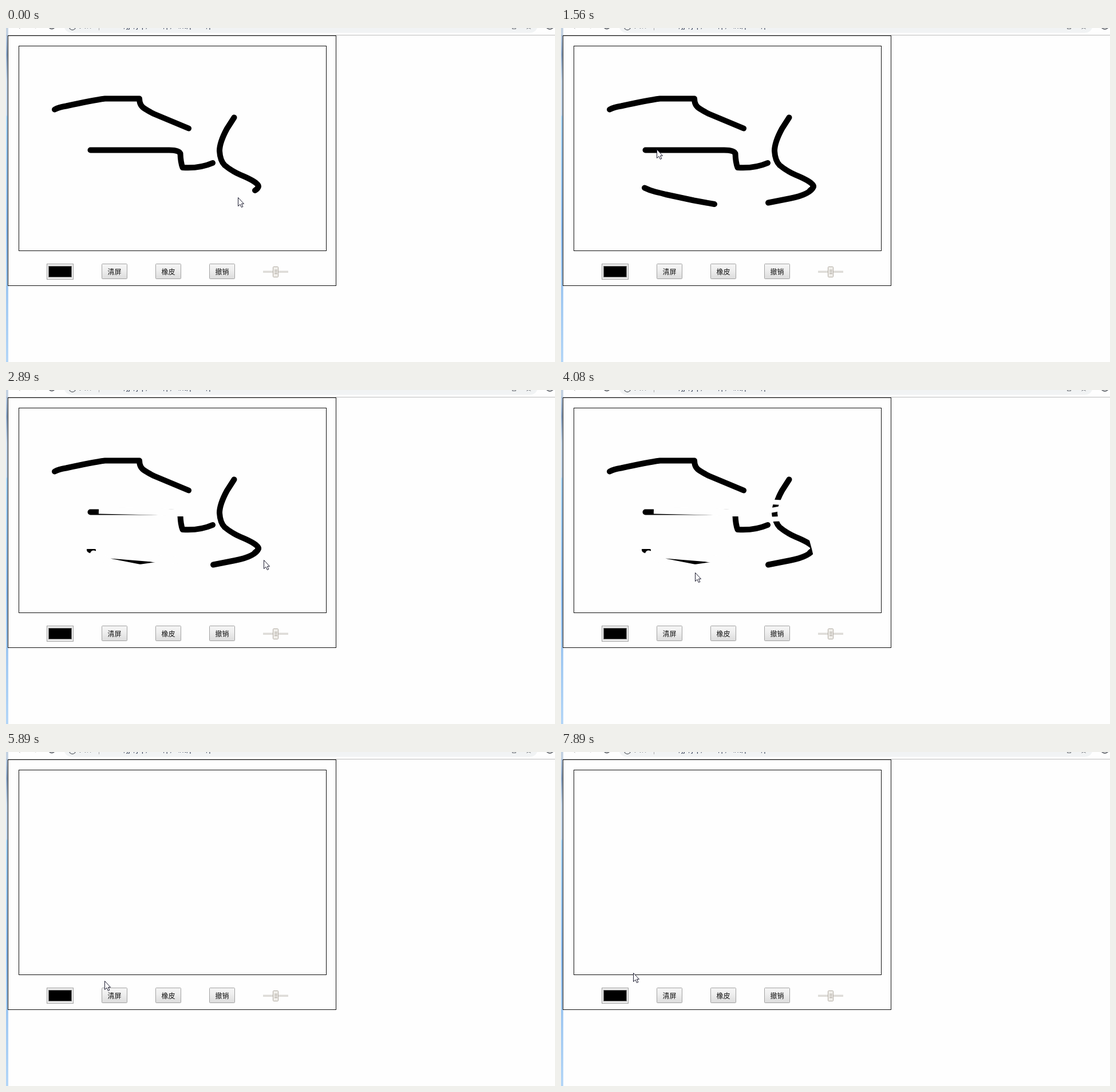
Write an HTML page that moves like this. It is 959x584 px and loops after 8 s.

```html
<!DOCTYPE html>
<html lang="zh">
<head>
<meta charset="utf-8">
<title>画板</title>
<style>
  html, body { margin: 0; width: 100%; height: 100%; overflow: hidden; background: #fefefe; }
  svg { display: block; width: 959px; height: 584px; }
  text { font: 12px "Noto Sans CJK SC", "Noto Sans CJK", sans-serif; }
  .box { fill: none; stroke: #111; shape-rendering: crispEdges; }
  .ink path { fill: none; stroke: #000; stroke-width: 10; stroke-linecap: round; stroke-linejoin: round; }
  .ink .rub { stroke: #fefefe; stroke-width: 12; stroke-linecap: butt; stroke-linejoin: miter; }
  .ink .soft { stroke-linecap: round; }
  .ink .thin { stroke-width: 8.5; }
  .btn rect { fill: url(#face); stroke: #a2a2a2; }
  .btn text { text-anchor: middle; fill: #111; }
  .btn.hover rect { fill: url(#lit); stroke: #858585; }
  .btn.down rect { fill: url(#pressed); stroke: #8c8c8c; }
  .icons { fill: none; stroke: #666a70; }
</style>
</head>
<body>
<svg viewBox="0 0 959 584">
  <defs>
    <linearGradient id="face" x2="0" y2="1">
      <stop stop-color="#f5f5f5"/><stop offset=".4" stop-color="#efefef"/><stop offset="1" stop-color="#dcdcdc"/>
    </linearGradient>
    <linearGradient id="lit" x2="0" y2="1">
      <stop stop-color="#f8f8f8"/><stop offset="1" stop-color="#e2e2e2"/>
    </linearGradient>
    <linearGradient id="pressed" x2="0" y2="1">
      <stop stop-color="#dedede"/><stop offset="1" stop-color="#f2f2f2"/>
    </linearGradient>
    <linearGradient id="desk" x2="0" y2="1">
      <stop stop-color="#b4c6dc"/><stop offset=".06" stop-color="#8ca5c4"/><stop offset=".14" stop-color="#c3d5e8"/>
      <stop offset=".245" stop-color="#c0d4ea"/><stop offset=".25" stop-color="#a5d0f8"/>
      <stop offset=".6" stop-color="#8fbcec"/><stop offset="1" stop-color="#b4d6f7"/>
    </linearGradient>
  </defs>

  <rect width="959" height="584" fill="#fefefe"/>
  <rect x="101" y="-20" width="828" height="28.5" rx="14" fill="#f1f3f4"/>
  <g class="icons">
    <path d="M20 -3L24.500 1.200" stroke="#999"/>
    <path d="M55 -3L51 1.200" stroke="#ccc"/>
    <circle cx="80" cy="-4" r="5.500" stroke-width="1.800"/>
    <circle cx="116" cy="-2" r="5.500" stroke-width="1.300"/>
    <path d="M162.500 0V4" stroke="#aaa"/>
    <path d="M884.500 -3V1.500H890.500V-3M909.500 1.500L913 -.5 916.500 1.500"/>
    <circle cx="950" cy="-5" r="7" stroke-width="1.800"/>
  </g>
  <text x="128" y="0" fill="#5f6368">文件</text>
  <text x="173" y="0" fill="#303a50">demo/jjs/jsp/desk/p/画成/paint/p</text>
  <path d="M4 12.500H959" stroke="#bcbcbc"/>
  <rect y="12" width="4" height="572" fill="url(#desk)"/>
  <rect width="4" height="12" fill="#c4d2e2"/>

  <rect class="box" x="3.500" y="13.500" width="573" height="437"/>
  <rect class="box" x="22.500" y="31.500" width="537" height="358"/>

  <g class="ink" id="ink">
    <path d="M85 142.500Q92 138.500 105 136.500Q150 126.500 173 123.500H233Q233 136 243 141.500Q250 146 258 150L319 175.500"/>
    <path d="M147.500 213.500H285Q302 213.500 304.500 219.500Q305 235 308.500 244Q338 246 361 236"/>
    <path d="M398.500 156.500L386 176Q373 200 373 215Q374 232 382 240Q394 250 410 257Q441 270 441 277Q440 281 435 284"/>
  </g>

  <rect x="71.500" y="412.500" width="46" height="27" fill="#ededed" stroke="#a2a2a2"/>
  <rect x="74.500" y="416.500" width="40" height="19" stroke="#777"/>
  <g id="bar"></g>
  <rect x="449" y="424.500" width="44" height="3.500" fill="#dedcd8"/>
  <rect x="466.500" y="417.500" width="9" height="18" rx="1" fill="#f0eeea" stroke="#b1aba2"/>
  <path d="M469 423.500H474M469 426.500H474M469 429.500H474" stroke="#a09a92"/>

  <path id="cursor" d="M.5 .5V15.500L4 12.300 6.400 17.500 8.800 16.400 6.400 11.300H10.500Z" fill="#fff" stroke="#1c1c30"/>
</svg>
<script>
const LOOP = 8000;
const NS = 'http://www.w3.org/2000/svg';
const $ = id => document.getElementById(id);

function add(parent, tag, attrs, text = '') {
  const el = document.createElementNS(NS, tag);
  for (const k in attrs) el.setAttribute(k, attrs[k]);
  el.textContent = text;
  parent.append(el);
  return el;
}

// Pointer poses, evenly spaced between two times
const poses = [];
function burst(from, to, path) {
  const pts = path.split(' ');
  pts.forEach((p, i) => {
    const [x, y] = p.split(',');
    poses.push({ t: from + (to - from) * i / Math.max(1, pts.length - 1), x, y });
  });
}
burst(0, 0, '405,296');
burst(120, 1130, '362,305 250,192 146,279 205,293 268,308 281,355 283,422 281,421');
burst(1260, 2220, '270,385 205,280 167,212 215,213 262,214 321,219 230,291 147,275');
burst(2340, 3300, '152,287 234,311 270,312 395,304 450,297 446,283 432,260 384,218');
burst(3440, 4080, '366,226 382,207 370,197 387,178 318,252 234,319');
burst(4230, 4530, '198,392 181,440 176,428');
burst(5340, 5490, '176,428 176,428');
burst(5770, 6470, '172,400 158,310 144,210 131,130 135,102 137,91');
burst(6770, 6920, '145,88 137,96');
burst(7200, 7890, '150,150 172,220 165,290 145,350 121,380 126,386');

// Lines that grow from one time to another
const lines = [];
function grow(from, to, d, cls = '') {
  lines.push({ from, to, el: add($('ink'), 'path', { d, class: cls, pathLength: 1 }) });
}
grow(0, 264, 'M441 277Q436 291 400 298L362 305.500');
grow(400, 697, 'M146 279.500Q155 284 165 286.500Q176 289 183 291L232 301.500 268 308');
grow(1535, 1946, 'M162 210.500L262 212.700 300 215 312 215', 'rub');
grow(1947, 2220, 'M300 298L262 295 183 288.500 163 284V272H138', 'rub');
grow(2330, 2614, 'M153 286.500L183 301 234 311 262 307H280', 'rub soft');
grow(2889, 3163, 'M447 290L444 277 438 255', 'rub');
grow(3163, 3300, 'M388 225L364 226', 'rub thin');
grow(3430, 3568, 'M364 211L386 207', 'rub thin');
grow(3568, 3696, 'M390 197L364 195.500', 'rub thin');

const [clear, eraser] = ['清屏', '橡皮', '撤销'].map((label, i) => {
  const x = 167.5 + 94 * i;
  const g = add($('bar'), 'g', { class: 'btn' });
  add(g, 'rect', { x, y: 412.5, width: 44, height: 26, rx: 1 });
  add(g, 'text', { x: x + 22, y: 431 }, label);
  return g;
});

function setButton(btn, hover, down) {
  btn.classList.toggle('hover', hover);
  btn.classList.toggle('down', down);
}

function draw(now) {
  const time = now % LOOP;
  const { t, x, y } = poses.findLast(p => p.t <= time);
  $('cursor').setAttribute('transform', `translate(${x} ${y})`);
  for (const { from, to, el } of lines) {
    const p = Math.min(1, Math.max(0, (t - from) / (to - from)));
    el.style.display = p ? '' : 'none';
    el.style.strokeDasharray = p < 1 ? `${p} 2` : 'none';
  }
  $('ink').style.display = t < 5490 ? '' : 'none';
  setButton(eraser, t > 950 && t < 1260, t === 1130);
  setButton(clear, t >= 4530 && t < 5770, t === 5340);
}

function tick() {
  draw(performance.now());
  requestAnimationFrame(tick);
}
tick();
</script>
</body>
</html>
```
